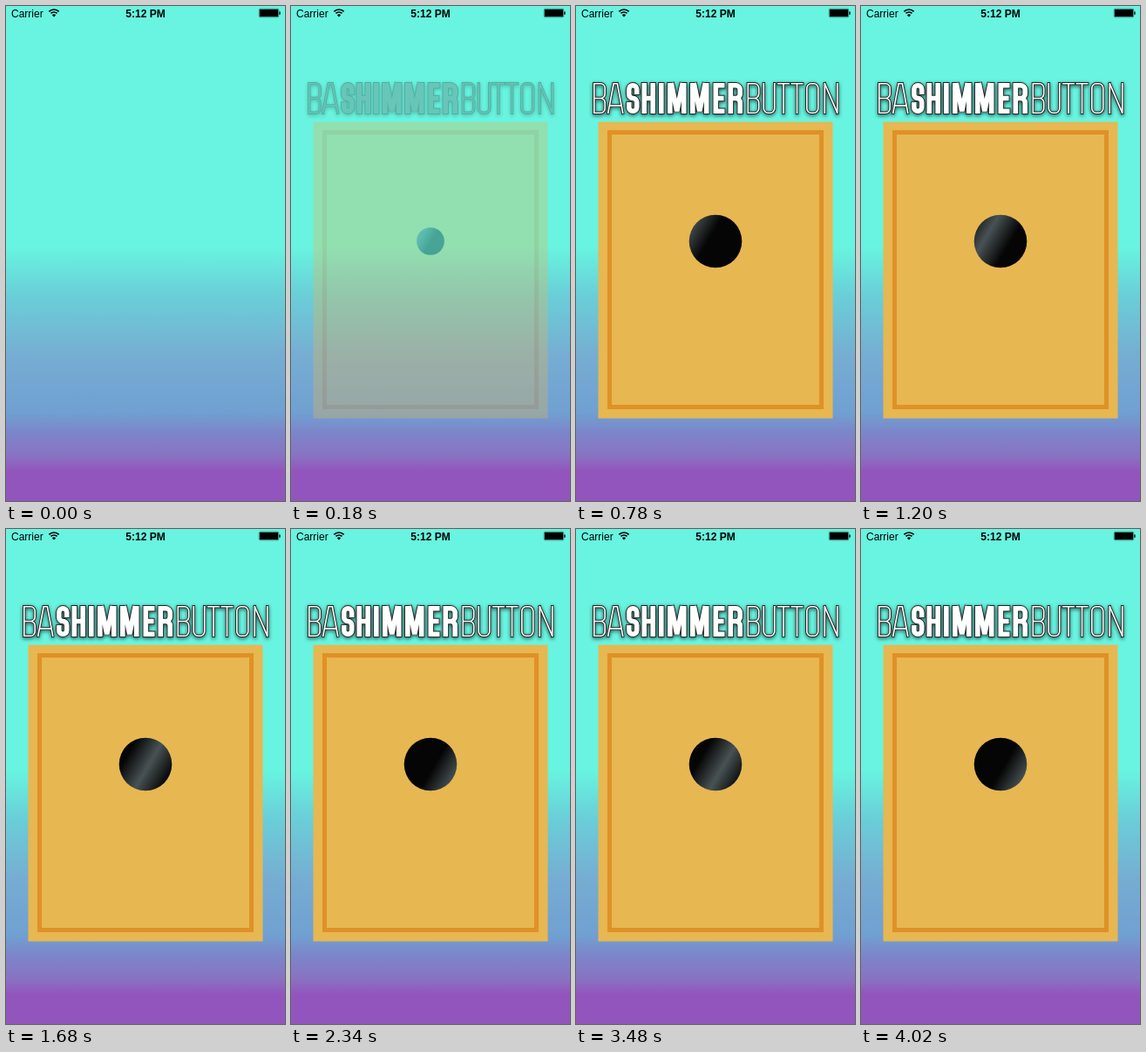
An HTML page with a canvas for the animation above (4.05 s loop, 320 by 566 pixels).

```html
<!DOCTYPE html>
<html lang="en">
<head>
<meta charset="utf-8">
<title>BAShimmerButton</title>
<style>
html, body { margin: 0; width: 320px; height: 566px; overflow: hidden; }
canvas { position: absolute; left: 0; top: 0; }
</style>
</head>
<body>
<canvas id="back" width="320" height="566"></canvas>
<canvas id="view" width="320" height="566" role="img" aria-label="BAShimmerButton"></canvas>
<script>
const LOOP = 4050, STEP = 30;
const GROW = 420, SETTLE = 300, SWEEP = 1680, FADE_DELAY = 30;
const back = document.getElementById('back').getContext('2d');
const view = document.getElementById('view');
const ctx = view.getContext('2d');

// Strokes on a 0..8 grid: "xy xy xy", separated by commas
const GLYPHS = {
  A: '08 30 50 88,16 76',
  B: '08 00,00 80 84 04,04 84 88 08',
  E: '80 00 08 88,04 74',
  H: '00 08,80 88,04 84',
  I: '00 08',
  M: '08 00,80 88,10 48 70',
  N: '08 00,80 88,00 88',
  O: '40 80 88 08 00 40',
  R: '08 00,00 80 84 04,04 84 88',
  S: '82 80 00 04 84 88 08 06',
  T: '00 80,40 48',
  U: '00 08 88 80'
};
const ROUND = 'BORSU';
const TOP = 88, CAP = 35;

function addGlyph(path, ch, x, w, lw) {
  const sx = (w - lw) / 8, sy = (CAP - lw) / 8;
  const r = ROUND.includes(ch) ? Math.min(5, sx * 4) : 0;
  for (const part of GLYPHS[ch].split(',')) {
    const pts = part.split(' ').map(p => [x + lw / 2 + p[0] * sx, TOP + lw / 2 + p[1] * sy]);
    path.moveTo(...pts[0]);
    pts.slice(1).forEach((p, i) => {
      const next = pts[i + 2];
      if (next && r) path.arcTo(...p, ...next, r);
      else path.lineTo(...p);
    });
  }
}

function word(text, xs, ws, lw) {
  const path = new Path2D();
  [...text].forEach((ch, i) => addGlyph(path, ch, xs[i], ws[i], lw));
  return { path, lw };
}

const title = [
  word('BA', [20, 36], [14, 18.5], 1.6),
  word('SHIMMER', [58, 75.5, 95, 105, 131, 157.5, 174.5], [14.5, 15.5, 5.6, 21.5, 21.5, 13, 16.5], 5.6),
  word('BUTTON', [196.5, 214.5, 231, 246.5, 264, 284.5], [14, 14, 14, 14, 14.5, 16], 1.6)
];

const ease = p => p * p * (3 - 2 * p);
const unit = p => Math.max(0, Math.min(1, p));

function drawBack() {
  const y0 = 275, y1 = 532;
  const g = back.createLinearGradient(0, y0, 0, y1);
  const stops = [[y0, '#68f4e0'], [330, '#6acfd8'], [400, '#76add2'], [465, '#70a0d2'],
    [487, '#7c86ca'], [515, '#8972c2'], [y1, '#9255be']];
  for (const [y, color] of stops) g.addColorStop((y - y0) / (y1 - y0), color);
  back.fillStyle = g;
  back.fillRect(0, 0, 320, 566);

  back.fillStyle = back.strokeStyle = '#000';
  back.font = '12px "Liberation Sans", Arial, sans-serif';
  back.fillText('Carrier', 6, 12.5);
  back.font = 'bold 12px "Liberation Sans", Arial, sans-serif';
  back.textAlign = 'center';
  back.fillText('5:12 PM', 160, 12.5);

  // Wi-Fi
  const a = Math.PI * 0.25;
  back.lineWidth = 1.7;
  for (const r of [5, 8]) {
    back.beginPath();
    back.arc(55, 12, r, -Math.PI + a, -a);
    back.stroke();
  }
  back.beginPath();
  back.moveTo(55, 12.5);
  back.arc(55, 12.5, 3, -Math.PI + a, -a);
  back.fill();

  // Battery
  back.lineWidth = 0.5;
  back.beginPath();
  back.roundRect(290.25, 3.25, 22.5, 9.5, 1.5);
  back.stroke();
  back.fillRect(291, 4, 21, 8);
  back.fillRect(313.3, 6.4, 1.3, 3.4);
}

function drawTitle(fade) {
  ctx.save();
  ctx.lineCap = 'square';
  ctx.miterLimit = 3;
  ctx.strokeStyle = '#222';
  ctx.shadowColor = 'rgba(0,0,0,.65)';
  ctx.shadowBlur = 4;
  ctx.shadowOffsetY = 1.5;
  for (const { path, lw } of title) {
    ctx.lineWidth = lw + 1.8;
    ctx.stroke(path);
  }
  // The shadow shows through the letters while they fade in
  ctx.shadowColor = 'transparent';
  ctx.strokeStyle = '#fff';
  ctx.globalAlpha = fade;
  for (const { path, lw } of title) {
    ctx.lineWidth = lw;
    ctx.stroke(path);
  }
  ctx.restore();
}

function drawButton(t) {
  const since = t - GROW - SETTLE;
  const scale = t < GROW ? 1.33 * ease(t / GROW) : 1.33 - 0.33 * ease(unit((t - GROW) / SETTLE));
  const pos = since < 0 ? -25 : -37 + 71 * (since % SWEEP) / SWEEP;
  ctx.save();
  ctx.translate(160, 269);
  ctx.scale(scale, scale);
  const nx = 0.86, ny = 0.51, half = 27;
  const g = ctx.createLinearGradient((pos - half) * nx, (pos - half) * ny, (pos + half) * nx, (pos + half) * ny);
  g.addColorStop(0, '#050505');
  g.addColorStop(0.5, '#485254');
  g.addColorStop(1, '#050505');
  ctx.fillStyle = g;
  ctx.beginPath();
  ctx.arc(0, 0, 30.3, 0, Math.PI * 2);
  ctx.fill();
  ctx.restore();
}

function frame() {
  let t = performance.now() % LOOP;
  t -= t % STEP;
  const fade = ease(unit((t - FADE_DELAY) / (GROW - FADE_DELAY)));
  view.style.opacity = fade;
  ctx.clearRect(0, 0, 320, 566);
  ctx.fillStyle = '#e7b752';
  ctx.fillRect(25.5, 132.5, 269, 339);
  ctx.strokeStyle = '#df9127';
  ctx.lineWidth = 5;
  ctx.strokeRect(38.5, 144.5, 243, 314);
  drawTitle(fade);
  drawButton(t);
  requestAnimationFrame(frame);
}

drawBack();
frame();
</script>
</body>
</html>
```
